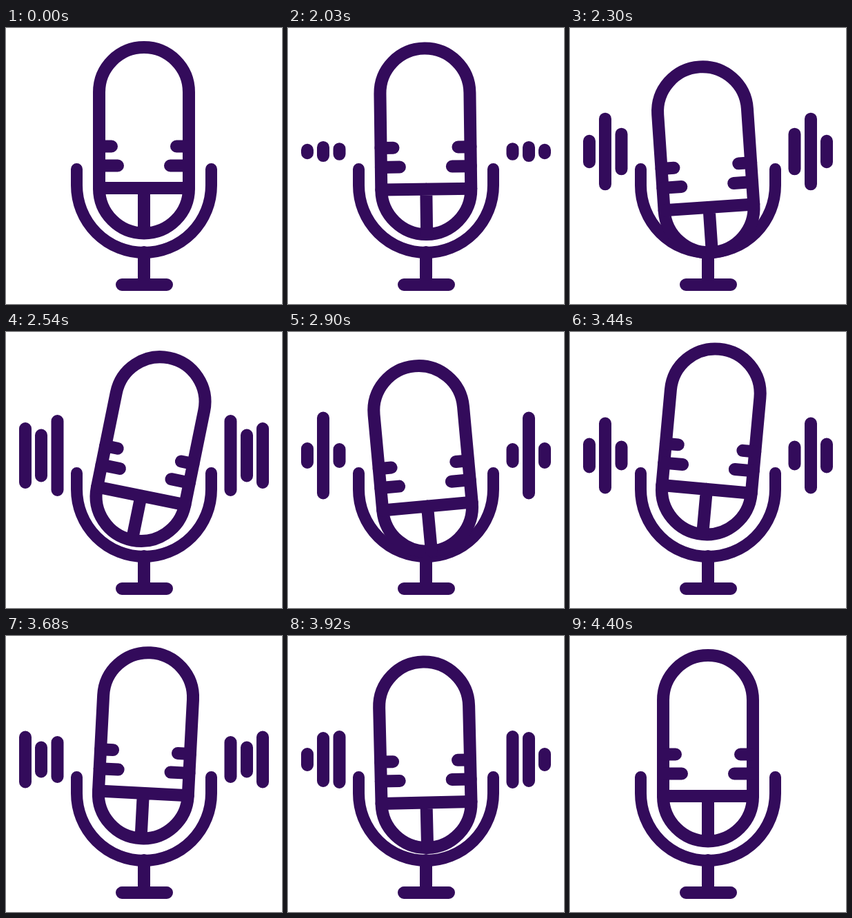
An HTML page that plays this animation: 400 by 400 pixels, repeating every 4.43 s.

```html
<!DOCTYPE html>
<html lang="en">
<head>
<meta charset="utf-8">
<title>Microphone</title>
<style>
  html, body { margin: 0; width: 100%; height: 100%; overflow: hidden; background: #fff; }
  svg { display: block; width: 100%; height: 100%; }
</style>
</head>
<body>
<svg viewBox="0 0 400 400" fill="none" stroke="#330b5b" stroke-width="18" stroke-linecap="round">
  <path d="M102.5 204.5V228a97.5 97.5 0 0 0 195 0V204.5" stroke-width="17"/>
  <path d="M200 325V372M168 372H233"/>
  <g id="mic">
    <rect x="135" y="28" width="130" height="269.5" rx="65"/>
    <path d="M135 232H265M200 232V297M135 171.5H153M135 199.5H162M265 171.5H247M265 199.5H238"/>
  </g>
  <path id="bars"/>
</svg>
<script>
  const LOOP = 4430, START = 2015, END = 4390;
  const mic = document.getElementById('mic');
  const bars = document.getElementById('bars');

  const drop = {
    times: [1985, 2290, 2736, 2970, 3570, 3920, 4390],
    values: [0, 28, -9, 28, -8, 9.5, 0]
  };
  const tilt = {
    times: [1985, 2200, 2580, 2980, 3500, 3930, 4390],
    values: [0, -7, 12, -7, 5.6, -1.4, 0]
  };
  const barTimes = [1985, 2200, 2370, 2540, 2900, 3170, 3440, 3680, 3920, 4150, 4395];
  const barTracks = [
    { x: 28, values: [0, 40, 25, 78, 20, 70, 33, 65, 16, 35, 0] },
    { x: 51, values: [0, 112, 85, 59, 109, 45, 93, 35, 62, 20, 0] },
    { x: 74.5, values: [0, 70, 40, 100, 18, 75, 25, 50, 66, 30, 0] }
  ];

  // Sine ease between neighbouring keys.
  function sample(times, values, t) {
    const i = times.findIndex(time => time > t);
    if (i < 1) return 0;
    const p = (t - times[i - 1]) / (times[i] - times[i - 1]);
    return values[i - 1] + (values[i] - values[i - 1]) * (1 - Math.cos(Math.PI * p)) / 2;
  }

  function barPath(t) {
    return barTracks.map(({ x, values }) => {
      const length = Math.max(0.1, sample(barTimes, values, t));
      const line = `${179 - length / 2}v${length}`;
      return `M${x} ${line}M${400 - x} ${line}`;
    }).join('');
  }

  function draw(now) {
    const t = now % LOOP;
    const active = t >= START && t < END;
    const y = active ? sample(drop.times, drop.values, t) : 0;
    const angle = active ? sample(tilt.times, tilt.values, t) : 0;
    mic.setAttribute('transform', `translate(0 ${y}) rotate(${angle} 200 210.5)`);
    bars.setAttribute('d', active ? barPath(t) : '');
  }

  const origin = performance.now();
  function tick() {
    draw(performance.now() - origin);
    requestAnimationFrame(tick);
  }
  tick();
</script>
</body>
</html>
```
